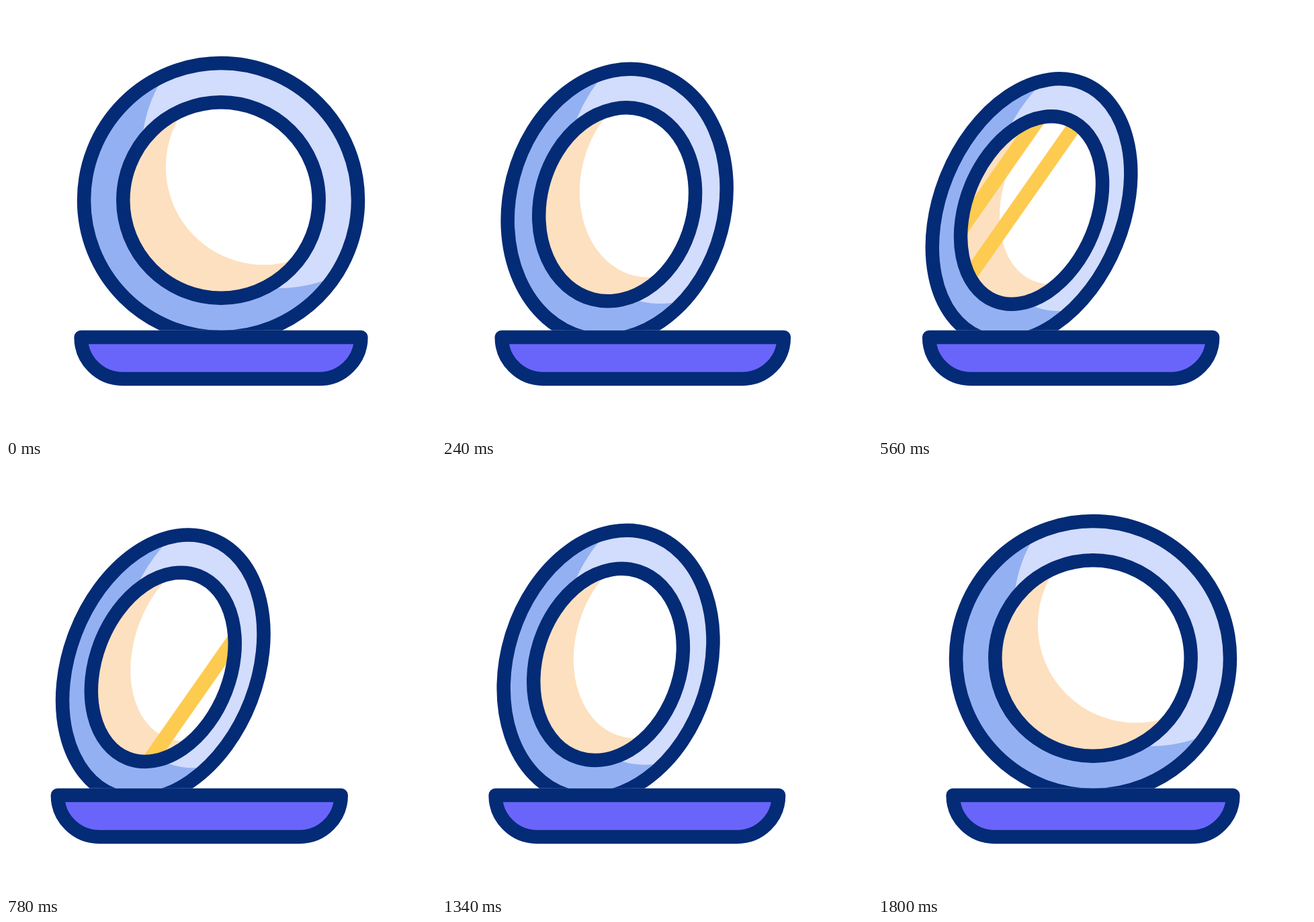
An HTML page for the animation above (2400 ms loop, 640 px wide and 640 px high).

```html
<!DOCTYPE html>
<html lang="en">
<head>
<meta charset="utf-8">
<title>Compact mirror</title>
<style>
  html, body { margin: 0; width: 100%; height: 100%; overflow: hidden; background: #fff; }
  svg { display: block; width: 640px; height: 640px; }
  .line {
    fill: none;
    stroke: #042b76;
    stroke-width: 20.5;
    stroke-linejoin: round;
    vector-effect: non-scaling-stroke;
  }
</style>
</head>
<body>
<svg viewBox="0 0 640 640">
  <defs>
    <clipPath id="aboveTray"><rect width="640" height="482.7"/></clipPath>
    <clipPath id="rimClip"><circle r="204"/></clipPath>
    <clipPath id="glassClip"><circle r="145.7"/></clipPath>
    <clipPath id="shineClip"><circle class="tilt" r="145.7"/></clipPath>
  </defs>

  <g clip-path="url(#aboveTray)">
    <g class="tilt">
      <circle r="204" fill="#93b1f2"/>
      <g clip-path="url(#rimClip)"><circle cx="86" cy="-73" r="204" fill="#d2dcfc"/></g>
      <circle class="line" r="204"/>
      <circle r="145.7" fill="#fde0bf"/>
      <g clip-path="url(#glassClip)"><circle cx="63.5" cy="-49.5" r="145.7" fill="#fff"/></g>
    </g>
    <g clip-path="url(#shineClip)">
      <g id="shine" fill="#fdcb50">
        <rect x="-88" y="-178" width="27" height="640"/>
        <rect x="-26" y="-178" width="26" height="640"/>
      </g>
    </g>
    <g class="tilt"><circle class="line" r="145.7"/></g>
  </g>

  <path id="tray" class="line" style="fill:#6a65fa"/>
</svg>

<script>
  const LOOP = 2400, STEP = 20, OPENED = 404, END = 1800;
  const tilted = document.querySelectorAll('.tilt');
  const shine = document.getElementById('shine');
  const tray = document.getElementById('tray');

  const smooth = u => u * u * (3 - 2 * u);
  const power = u => u ** 1.4;

  // Swing out to `peak`, drift back to `rest` until `close`, then return to 0.
  function swing(t, peak, rest, close, drift) {
    if (t >= END) return 0;
    if (t < OPENED) return peak * smooth(t / OPENED);
    if (t < close) return peak + (rest - peak) * drift((t - OPENED) / (close - OPENED));
    return rest * (1 - smooth((t - close) / (END - close)));
  }

  function draw(t) {
    const p = swing(t, 1.0155, 0.79, 1400, smooth);
    const pose = `translate(${320 - 91.4 * p} ${289 + 15 * p * p}) ` +
      `rotate(${22.3 * p}) scale(${1 - 0.333 * p} 1)`;
    tilted.forEach(el => el.setAttribute('transform', pose));

    const sweep = 306 + 0.757 * (t - 560);
    shine.setAttribute('transform', `translate(${sweep} 178) skewX(-35)`);

    const q = swing(t, 1.005, 0.895, 1365, power);
    const mid = 320 - 33 * q, half = 208.4 + 2.6 * q;
    tray.setAttribute('d', `M${mid - half} 493H${mid + half}` +
      `a62 62 0 0 1 -62 62H${mid - half + 62}a62 62 0 0 1 -62 -62z`);
  }

  const start = performance.now();
  function frame() {
    const t = (performance.now() - start) % LOOP;
    draw(Math.floor(t / STEP) * STEP);
    requestAnimationFrame(frame);
  }
  frame();
</script>
</body>
</html>
```
